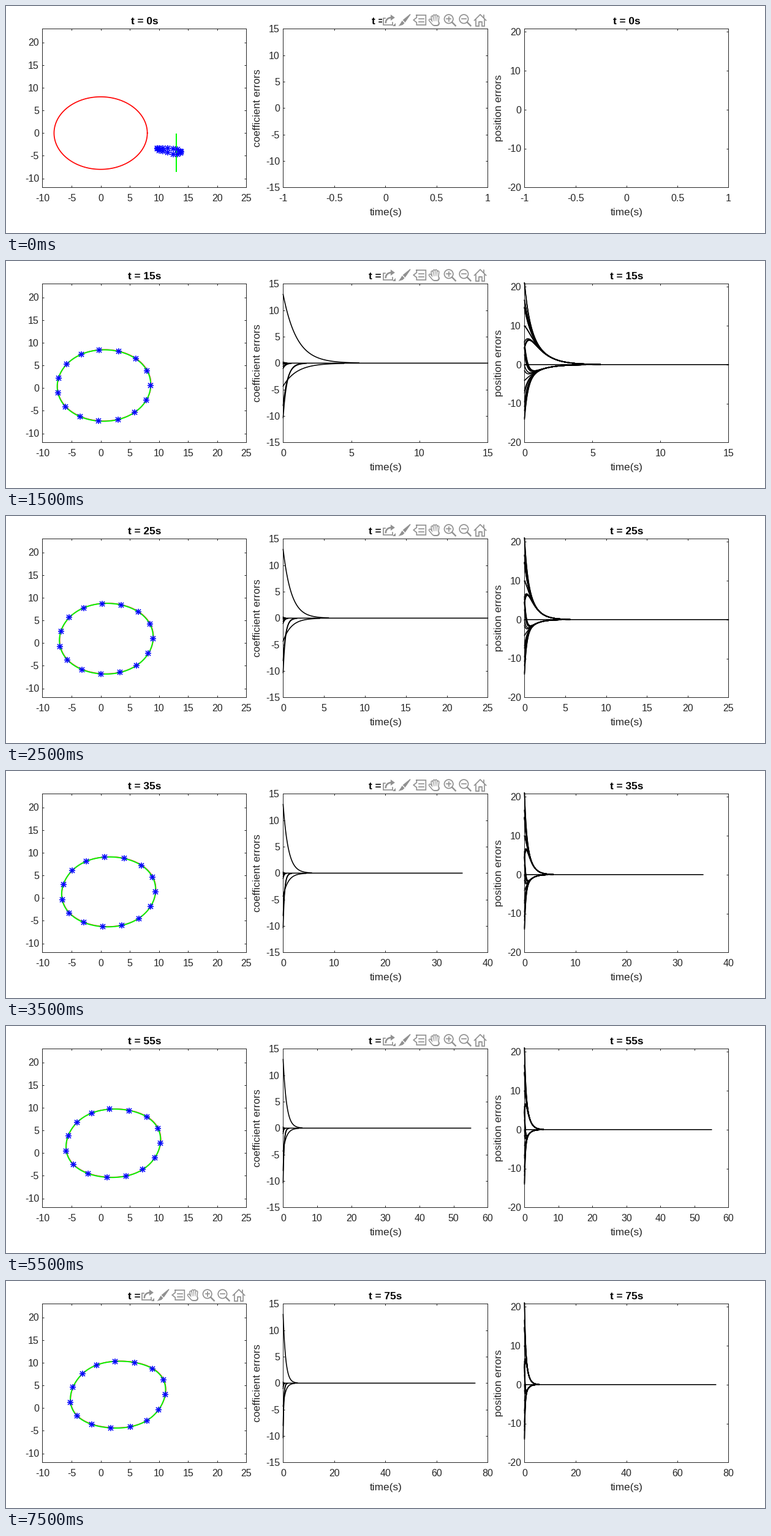
Animation, 1239 px wide and 372 px high, one loop 8000 ms. Source, as a matplotlib script:

```python
import numpy as np
import matplotlib.pyplot as plt
from matplotlib.animation import FuncAnimation
from matplotlib.patches import Circle, Polygon, Rectangle

W, H, DPI = 1239, 372, 128
PX = 72 / DPI  # points per pixel
TOP, BOTTOM = 37.4, 297.4
INK, ICON = "#262626", "#919191"
RED, GREEN, BLUE = "#ff0000", "#00ff00", "#0000ff"

plt.rcParams.update({
    "font.family": "Liberation Sans",
    "axes.linewidth": PX,
    "axes.edgecolor": INK,
    "path.simplify": False,
    "toolbar": "None",
})

fig = plt.figure(figsize=(W / DPI, H / DPI), dpi=DPI, facecolor="white")


def add_panel(left, right):
    return fig.add_axes([left / W, 1 - BOTTOM / H,
                         (right - left) / W, (BOTTOM - TOP) / H])


SPANS = [(59.4, 392.4), (452.4, 786.4), (846.4, 1179.4)]
YLIMS = [(-12, 23), (-15, 15), (-20, 20.75)]
YTICKS = [range(-10, 21, 5), range(-15, 16, 5), range(-20, 21, 10)]
YLABELS = [None, "coefficient errors", "position errors"]

panels = [add_panel(*s) for s in SPANS]
over = fig.add_axes([0, 0, 1, 1], zorder=5)

# Robots: evenly spaced phases on the contour, clustered at the start
PHASE = 2 * np.pi * np.arange(15) / 15
CURVE = np.linspace(0, 2 * np.pi, 300)
jitter = np.random.default_rng(4).uniform(-0.2, 0.2, 15)
START_X = 11.75 + 2.1 * np.cos(4 * PHASE)
START_Y = -3.9 - 0.35 * np.cos(4 * PHASE) + 0.55 * np.sin(4 * PHASE) + jitter


def contour(t, a):
    """Drifting, slowly deforming target."""
    x = 0.04 * t + (8 + 0.0013 * t) * np.cos(a) \
        + 0.007 * t * np.sin(a) + 0.0026 * t * np.sin(3 * a)
    y = 0.04 * t + (8 - 0.0058 * t) * np.sin(a) + 0.0027 * t * np.sin(3 * a)
    return x, y


def estimate(t, a):
    """Estimated contour: lags the target and starts from a flat guess."""
    x, y = contour(t - 1 + np.exp(-t), a)
    slow, fast = np.exp(-t), np.exp(-3 * t)
    return (x + 13 * slow - 8 * np.cos(a) * fast,
            y - 4.35 * slow - 12.15 * np.sin(a) * fast)


def time_axis(t):
    if t == 0:
        return (-1, 1), np.linspace(-1, 1, 5)
    step = next(s for s in (1, 2, 5, 10, 20) if np.ceil(t / s) <= 6)
    count = int(np.ceil(t / step))
    return (0, count * step), step * np.arange(count + 1)


def label(x, y, s, size=16, color=INK, **kw):
    over.text(x, y, s, fontsize=size * PX, va="baseline", color=color, **kw)


def frame_panel(k, xlim, xticks, title):
    ax, (left, right), ylim = panels[k], SPANS[k], YLIMS[k]
    ax.set(xlim=xlim, ylim=ylim, xticks=xticks, yticks=YTICKS[k])
    ax.tick_params(direction="in", top=True, right=True, length=3.4 * PX,
                   width=PX, color=INK, labelbottom=False, labelleft=False)
    for v in xticks:
        x = left + (v - xlim[0]) / (xlim[1] - xlim[0]) * (right - left)
        label(x, 320.4, f"{v:g}", ha="center")
    for v in YTICKS[k]:
        y = BOTTOM - (v - ylim[0]) / (ylim[1] - ylim[0]) * (BOTTOM - TOP)
        label(left - 5.5, y + 5.8, f"{v:g}", ha="right")
    mid = (left + right) / 2
    label(mid, 30, title, 17.3, "black", ha="center", weight="bold")
    if YLABELS[k]:
        label(mid + 0.5, 343, "time(s)", 17.3, ha="center")
        label(left - 37, (TOP + BOTTOM) / 2, YLABELS[k], 17.3, ha="center",
              rotation=90, rotation_mode="anchor")


def stroke(c, pts, width=1.7, color=ICON, cap="projecting"):
    x, y = np.array(pts, float).T
    over.plot(x + c, y + 23, color=color, lw=width * PX, zorder=6,
              solid_joinstyle="miter", solid_capstyle=cap)


def solid(c, pts):
    over.add_patch(Polygon(np.array(pts) + (c, 23), color=ICON, lw=0, zorder=6))


def draw_hand(c):
    # Thick grey strokes with thinner white ones inside leave an outline
    for color, trim in ((ICON, 0), ("white", 3)):
        for i in range(4):
            x = 3.2 * i - 4.4
            stroke(c, [(0.7 * x + 0.5, 4), (x, abs(x - 0.5) * 0.6 - 8)],
                   4.8 - trim, color, "round")
        stroke(c, [(-8, 0), (-3, 6)], 4.8 - trim, color, "round")
        stroke(c, [(-1, 5), (3, 5)], 9 - trim, color, "round")


def toolbar(right):
    over.add_patch(Rectangle((right - 172.5, 12.5), 172.5, 23.8,
                             color="white", lw=0, zorder=4))
    share, brush, tip, hand, zin, zout, home = right - 160.5 + 24.7 * np.arange(7)

    stroke(share, [(-7, -3), (-10, -3), (-10, 8), (5, 8), (5, 4)])
    u = np.linspace(0, np.pi / 2, 12)
    stroke(share, np.c_[3 - 9 * np.cos(u), 4 - 8 * np.sin(u)], 2.6)
    solid(share, [(2, -9), (9, -4), (2, 1)])
    solid(share, [(10, 5), (10, 10), (5, 10)])

    solid(brush, [(9, -10), (10, -9), (1, 4), (-3, 0)])
    solid(brush, [(-4, 1), (0, 5), (-3, 8), (-10, 10), (-7, 6)])

    stroke(tip, [(-5, -8), (10, -8), (10, 8), (-5, 8), (-5, 4), (-10, 0),
                 (-5, -4), (-5, -8)])
    for y in (-2.5, 2.5):
        stroke(tip, [(-1, y), (7, y)])

    draw_hand(hand)

    for c in (zin, zout):
        over.add_patch(Circle((c - 2, 21.3), 7.2, fill=False, ec=ICON,
                              lw=1.7 * PX, zorder=6))
        stroke(c, [(3.4, 3.6), (9, 9.2)], 2.4)
        stroke(c, [(-5.2, -1.7), (1.2, -1.7)])
    stroke(zin, [(-2, -4.9), (-2, 1.5)])

    stroke(home, [(-9.5, 0.5), (0, -9), (9.5, 0.5)])
    for side in (-1, 1):
        stroke(home, [(7 * side, -1), (7 * side, 9.5),
                      (2.5 * side, 9.5), (2.5 * side, 3), (0, 3)])
    stroke(home, [(6, -8), (6, -4)])


def draw_contours(t):
    ax = panels[0]
    ax.plot(*contour(t, CURVE), color=RED, lw=1.7 * PX)
    ax.plot(*estimate(t, CURVE), color=GREEN, lw=1.9 * PX)
    x, y = estimate(t, PHASE) if t else (START_X, START_Y)
    for marker, size in (("+", 10.4), ("x", 7.4)):
        ax.plot(x, y, marker, color=BLUE, ms=size * PX, mew=1.6 * PX)


def draw_errors(t):
    s = t * np.linspace(0, 1, 1500) ** 2
    slow, fast, own = np.exp(-s), np.exp(-3 * s), np.exp(-4 * s)
    style = dict(color="black", lw=1.6 * PX, zorder=3, clip_on=False)

    def decay(ax, e):
        # Settled parts are left to the single zero line
        ax.plot(s, np.where(abs(e) > 0.05, e, np.nan), **style)

    for ax in panels[1:]:
        ax.plot([0, t], [0, 0], snap=False, **style)
    for e in (13 * slow, -4.35 * slow, -8 * fast, -10.3 * np.exp(-3.5 * s)):
        decay(panels[1], e)
    for size in np.linspace(-1, 0.2, 4):
        decay(panels[1], size * np.exp(-5 * s))
    for a, x, y in zip(PHASE, START_X, START_Y):
        decay(panels[2], 13 * slow - 8 * np.cos(a) * fast + (x - 13) * own)
        decay(panels[2], -4.35 * slow + (y + 4.35 - 9.8 * np.sin(a)) * own)


def update(n):
    t = 5 * n
    for ax in panels + [over]:
        ax.clear()
    over.axis("off")

    draw_contours(t)
    if t:
        draw_errors(t)
    title = f"t = {t}s"
    frame_panel(0, (-10, 25), range(-10, 26, 5), title)
    for k in (1, 2):
        frame_panel(k, *time_axis(t), title)
    toolbar(SPANS[0 if t >= 75 else 1][1])
    over.set(xlim=(0, W), ylim=(H, 0))
    return []


anim = FuncAnimation(fig, update, frames=16, interval=500, init_func=lambda: [],
                     repeat=True, repeat_delay=0, blit=False)
plt.show()
```
